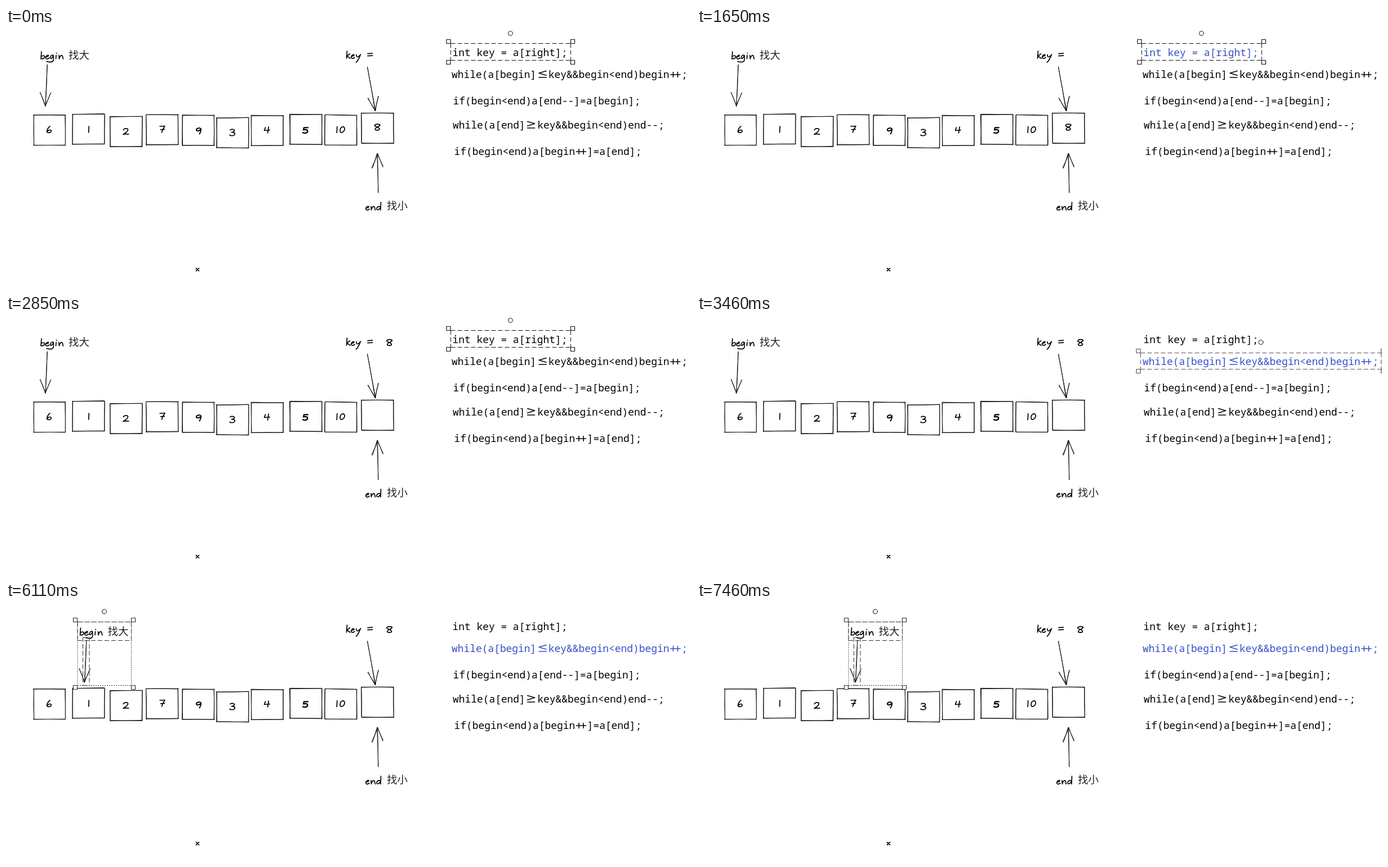
These frames come from a looping animation (1216x461 px, 8 s). An HTML page:

```html
<!DOCTYPE html>
<html lang="zh">
<head>
<meta charset="utf-8">
<title>Quicksort partition</title>
<style>
html, body { margin: 0; width: 100%; height: 100%; overflow: hidden; background: #fff; }
svg { display: block; width: 100%; height: 100%; }
text { white-space: pre; }
.code { font: 500 17.9px "Noto Sans Mono", "DejaVu Sans Mono", monospace; fill: currentColor; }
.cjk { font: 300 18.5px "Noto Sans CJK SC Light", "Noto Sans CJK SC DemiLight", "Noto Sans CJK SC", "Noto Sans CJK", sans-serif; fill: #222; }
path, rect, circle { fill: none; stroke: currentColor; stroke-linecap: round; stroke-linejoin: round; }
rect, .frame path { stroke-linecap: butt; }
.handle { fill: #fff; }
</style>
</head>
<body>
<svg id="stage" viewBox="0 0 1216 461" color="#000"></svg>
<script>
const stage = document.getElementById('stage');
const LOOP = 8000, BLUE = '#364fc7', GRAY = '#555';

// Pen strokes: letters sit on a baseline at 0, digits are centred on 0,0.
const PEN = {
  b: 'M2 -13L1 0M1.2 -3C2 -6 7 -7 7.5 -4C8 -1 3 1 1 -1',
  e: 'M.5 -3.5C3 -3.5 6 -4.5 5.5 -6C4.5 -8 0 -5 .3 -2C.6 .8 4 .5 6.5 -1.5',
  g: 'M6 -6.5C3 -8 -.2 -4 .5 -1.5C1.5 .5 5 -2.5 6 -6C6.5 -2 7 3 4.5 4.8C2.5 6 -2.5 5.5 -6 4.5',
  i: 'M.5 -6.5L0 -.3M1 -10.5l.2 .6',
  n: 'M.5 -6.5L1 0C1 -3 4 -7 6 -6.3C7.8 -5.5 7 -1 8 0',
  k: 'M2 -13L1 0M7 -8L1.5 -4L7.5 0',
  y: 'M.5 -6.5C.5 -2 3 -1 6 -5M8 -7C6 -2 4 4 0 7',
  d: 'M6.5 -6C3 -7.5 0 -4 .5 -1.5C1.5 1 5.5 -1 7 -4M8 -14L7.5 0',
  '=': 'M0 -8.3L8.5 -8.8M0 -4.3L8.5 -4.8',
  0: 'M.5 -5C-3 -5 -5 1 -3.5 4C-2 6.5 3 4 4 0C4.8 -3 3 -6 0 -4.8',
  1: 'M.3 -5.5L-.3 5.5',
  2: 'M-4.5 -2.5C-3 -6 3.5 -6 3.5 -3C3.5 0 -1 3 -5 5.5C-1 4 2 5 5 5',
  3: 'M-4 -4.5C-1 -6.5 4 -5.5 3.5 -3C3 -1 0 -.5 -1.5 -.3C2 -.8 5 1 4 3.5C3 6 -2 6.5 -5 4.5',
  4: 'M-2.5 -4.5L-4.5 .8L5 .2M3.2 -5.5L1.5 5.5',
  5: 'M4.5 -5L-2.5 -5L-3.5 -.8C0 -2 4 -1.5 3.8 1.5C3.5 5 -1.5 5.5 -4.5 4',
  6: 'M1.5 -6C-1 -4.5 -4 0 -3.8 3C-3.5 6.5 3.5 6 3.8 2.5C4 -.5 -1 0 -3 3',
  7: 'M-4.5 -5L4.5 -5.5C2 -2 0 2 -1 6M-3 .8L4 .3',
  8: 'M4.5 -4.5C1 -6.5 -5.5 -5 -4.5 -2.5C-3 -.5 4 .5 4 3C4 6 -3.5 6.3 -3.7 3.5C-3.8 .8 4.5 -1 5 -4',
  9: 'M4 -3.5C1 -6.5 -4.5 -4 -4 -1.2C-3.5 1.5 2.5 0 4 -3C4.5 0 3 3 1.5 5.5'
};

// Wide operators, each two code columns across.
const LIGATURE = {
  '≤': 'M7 -6L-6 -2.2L7 1.8M-6 5.5H7',
  '≥': 'M-7 -6L6 -2.2L-7 1.8M-7 5.5H6',
  '⧺': 'M-8.5 .5H8.5M-4 -4V5M4 -4V5'
};

let seed = 11;
const random = () => (seed = seed * 16807 % 2147483647) / 2147483647;
const jitter = size => (random() * 2 - 1) * size;

function add(parent, tag, attrs = {}, text) {
  const node = document.createElementNS('http://www.w3.org/2000/svg', tag);
  for (const key in attrs) node.setAttribute(key, attrs[key]);
  if (text) node.textContent = text;
  return parent.appendChild(node);
}

const group = (parent = stage) => add(parent, 'g');
const move = (node, x, y) => node.setAttribute('transform', `translate(${x} ${y})`);
const show = (node, on) => node.setAttribute('display', on ? 'inline' : 'none');

function pen(parent, char, x, y, width = 1.7) {
  const node = add(parent, 'path', { d: PEN[char], 'stroke-width': width });
  move(node, x, y);
  return node;
}

function word(parent, text, x, y, offsets) {
  const node = add(parent, 'g', { role: 'img', 'aria-label': text });
  [...text].forEach((char, i) => pen(node, char, x + offsets[i], y));
}

// A hand-drawn line: two slightly bowed passes.
function sketch(parent, x1, y1, x2, y2, wobble = 0.7) {
  let d = '';
  for (let pass = 0; pass < 2; pass++) {
    const w = () => jitter(wobble);
    d += `M${x1 + w()} ${y1 + w()}Q${(x1 + x2) / 2 + w()} ${(y1 + y2) / 2 + w()} ${x2 + w()} ${y2 + w()}`;
  }
  add(parent, 'path', { d, 'stroke-width': 1, color: '#111' });
}

function arrow(parent, x1, y1, x2, y2, ...barbs) {
  sketch(parent, x1, y1, x2, y2);
  for (const [x, y] of barbs) sketch(parent, x, y, x2, y2, 1);
}

function cell(x, y) {
  const r = x + 56.5, b = y + 53.5;
  sketch(stage, x, y, r, y);
  sketch(stage, r, y, r, b);
  sketch(stage, r, b, x, b);
  sketch(stage, x, b, x, y);
}

function codeLine(text, x, y) {
  const node = group();
  add(node, 'text', { class: 'code', x, y }, text.replace(/[≤≥⧺]/g, '  '));
  let column = 0;
  for (const char of text) {
    const d = LIGATURE[char];
    if (d) move(add(node, 'path', { d, 'stroke-width': 1.6 }), x + (column + 1) * 10.74, y - 6);
    column += d ? 2 : 1;
  }
  return node;
}

function dashed(parent, x1, y1, x2, y2, dash = '8 4') {
  const d = `M${x1} ${y1}H${x2}M${x1} ${y2}H${x2}M${x1} ${y1}V${y2}M${x2} ${y1}V${y2}`;
  add(parent, 'path', { d, 'stroke-dasharray': dash });
}

function selection(x1, y1, x2, y2, knobX, knobY, color, dash) {
  const node = add(stage, 'g', { class: 'frame', color });
  dashed(node, x1, y1, x2, y2, dash);
  for (const x of [x1 - 4, x2 + 3.5])
    for (const y of [y1 - 3.5, y2 + 3.5])
      add(node, 'rect', { class: 'handle', x: x - 3.5, y: y - 3.5, width: 7, height: 7, 'stroke-width': 1.2 });
  add(node, 'circle', { class: 'handle', cx: knobX, cy: knobY, r: 4, color: '#111' });
  return node;
}

// Array cells: left, top, digit, digit centre, pen width
const cells = [
  [49, 155, '6', 76.5, 181], [118, 153.3, '1', 147, 180.5], [185, 157.7, '2', 213, 184],
  [249, 154.3, '7', 277.5, 180], [313, 155.3, '9', 342, 183, 2], [374.3, 159.8, '3', 402, 186],
  [435.5, 155.7, '4', 463, 181.5], [504, 154, '5', 531.5, 182.3, 2.3], [566, 155, '1', 587.5, 181],
  [631.3, 151.5, '8', 659, 176.5]
];
let lastDigit;
for (const [x, y, digit, cx, cy, width] of cells) {
  cell(x, y);
  lastDigit = pen(stage, digit, cx, cy, width);
}
pen(stage, '0', 597, 181);

const begin = group();
word(begin, 'begin', 61, 55, [0, 9, 17, 27.5, 32.5]);
add(begin, 'text', { class: 'cjk', x: 111, y: 55 }, '找大');
arrow(begin, 73.5, 65, 70, 139, [61, 115], [80, 115]);

word(stage, 'key', 603.5, 54, [0, 9, 18]);
pen(stage, '=', 642, 54);
const keyDigit = pen(stage, '8', 680.5, 49);
arrow(stage, 641.5, 69, 655.5, 147, [642, 125], [660.5, 122]);

word(stage, 'end', 638.5, 324, [0, 9, 19]);
add(stage, 'text', { class: 'cjk', x: 676, y: 323 }, '找小');
arrow(stage, 661, 293, 659, 224, [650, 249], [669, 247]);

add(stage, 'path', { d: 'M337.5 427.7L342.5 432.3M342.5 427.7L337.5 432.3', 'stroke-width': 1.8 });

const keyLine = codeLine('int key = a[right];', 792.5, 49.5);
const whileLine = codeLine('while(a[begin]≤key&&begin<end)begin⧺;', 791, 88.5);
codeLine('if(begin<end)a[end--]=a[begin];', 793.5, 136);
codeLine('while(a[end]≥key&&begin<end)end--;', 793, 178.5);
codeLine('if(begin<end)a[begin⧺]=a[end];', 795.5, 225.5);

const frames = {
  key: selection(789.5, 27.5, 1002.5, 57.5, 895.5, 9.5, '#111'),
  digit: selection(669.5, 32.5, 692.5, 66.5, 681, 14, '#111'),
  loop: selection(787.5, 67.5, 1214.5, 96.5, 1001, 48.5, GRAY),
  begin: selection(61.5, 39.5, 157, 152.5, 109, 21, '#333', '2 2')
};
dashed(frames.begin, 61.5, 39.5, 157, 72.5);
dashed(frames.begin, 71, 67, 82.5, 152.5);

// Each step holds until the next: time, selected part, shift of "begin"
const steps = [
  [0, 'key'], [380, ''], [1650, 'key'], [2050, 'digit'], [2850, 'key'], [3460, 'loop'],
  [4520, 'begin', 4, 8], [6110, 'begin', 69.5, 4], [6660, 'begin', 142.5, 8], [7460, 'begin', 211.5, 4]
];

function draw(t) {
  const [, selected, dx = 0, dy = 0] = steps.findLast(step => step[0] <= t);
  for (const name in frames) show(frames[name], name === selected);
  move(begin, dx, dy);
  move(frames.begin, dx - 4, dy - 8);
  show(lastDigit, t < 2050);
  show(keyDigit, t >= 2050);
  keyLine.setAttribute('color', t >= 1650 && t < 2850 ? BLUE : '#000');
  whileLine.setAttribute('color', t >= 3460 ? BLUE : '#000');
}

const start = performance.now();
function tick() {
  draw((performance.now() - start) % LOOP);
  requestAnimationFrame(tick);
}
tick();
</script>
</body>
</html>
```
